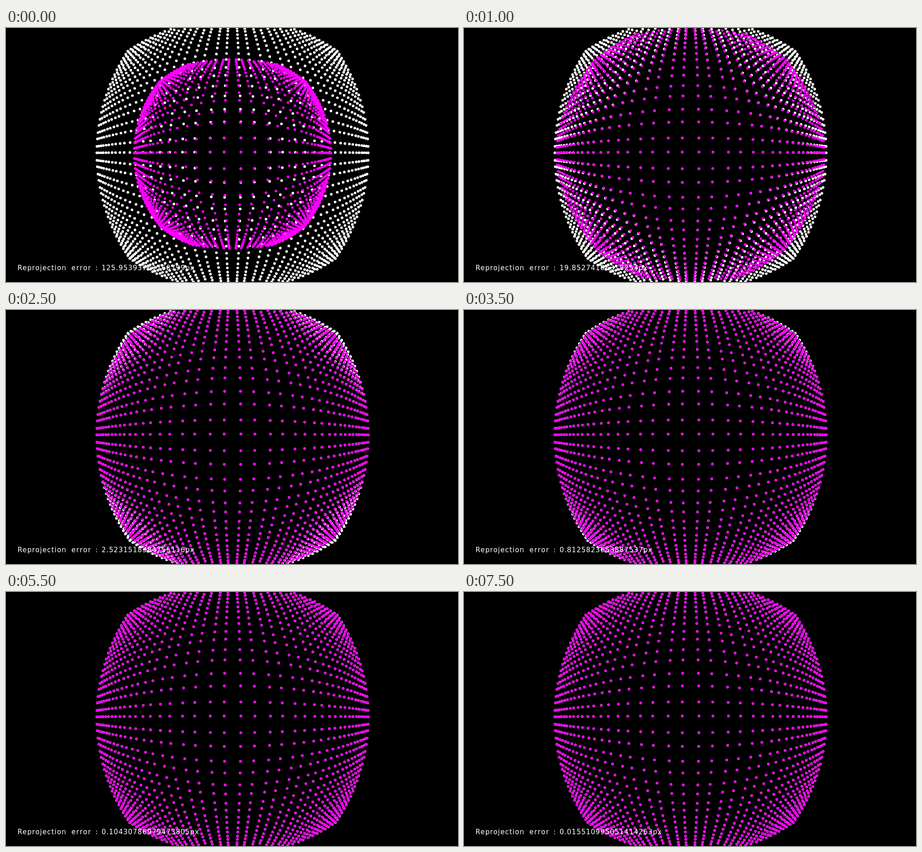
Recreate the animation shown at these times as an HTML page with a canvas. Size 998x561 px, loop 8000 ms.

```html
<!DOCTYPE html>
<html lang="en">
<head>
<meta charset="utf-8">
<title>Reprojection error</title>
<style>
  html, body { margin: 0; width: 100%; height: 100%; overflow: hidden; background: #000; }
  canvas { position: absolute; left: 0; top: 0; }
  span {
    position: absolute; top: 521px; line-height: 18px; white-space: pre;
    color: #fff; font-family: "DejaVu Sans", sans-serif; font-size: 15px;
  }
</style>
</head>
<body>
<canvas id="view" width="998" height="561"></canvas>
<span style="left:25.5px; letter-spacing:1.2px">Reprojection</span>
<span style="left:144.5px; letter-spacing:1.6px">error</span>
<span style="left:197.5px">:</span>
<span id="value" style="left:211px; letter-spacing:1px"></span>
<script>
const W = 998, H = 561, STEP = 500;
const CX = 500.2, CY = 277, F = 232, ALPHA = 0.6;
const DOT = 2.9;

const errors = [
  "125.95393761768799", "46.88465390047392", "19.85274106318254", "9.141180254842828",
  "4.760319528417063", "2.5231518384755116", "1.4207315962840377", "0.8125823653887537",
  "0.4809152736418205", "0.2884106395271846", "0.1732594081637529", "0.10430786979473805",
  "0.06412850397162843", "0.03971620485319574", "0.02480593718264051", "0.015510995051414263"
];

const ctx = document.getElementById("view").getContext("2d");
const value = document.getElementById("value");

// Unified camera model: plane point to image point, with the diagonal slopes.
function project(x, y) {
  const s = Math.sqrt(1 + (x * x + y * y) / (F * F));
  const d = ALPHA * s + 1 - ALPHA;
  const slope = v => (d - ALPHA * v * v / (F * F * s)) / (d * d);
  return { x: x / d, y: y / d, dx: slope(x), dy: slope(y) };
}

// Tag corners: gaps alternate between 37 and 31.6.
const axis = [];
for (let k = 0; k < 20; k++) {
  const u = (k % 2 ? 50.1 : 18.5) + 68.6 * (k >> 1);
  axis.push(u, -u);
}

const visible = [];
for (const v of axis) {
  for (const u of axis) {
    const p = project(u, v + 15.5);
    if (p.y + CY >= 0 && p.y + CY <= H) visible.push({ x: p.x, y: p.y });
  }
}

// Each pass inverts the model a little further, axis by axis.
const passes = [];
let guess = visible.map(p => ({ ...p }));
for (let n = 0; n < errors.length; n++) {
  const image = guess.map(g => project(g.x, g.y));
  passes.push(image);
  guess = guess.map((g, i) => ({
    x: g.x + (visible[i].x - image[i].x) / image[i].dx,
    y: g.y + (visible[i].y - image[i].y) / image[i].dy
  }));
}

function dots(points, color) {
  ctx.fillStyle = color;
  ctx.beginPath();
  for (const p of points) {
    const x = CX + p.x, y = CY + p.y;
    ctx.moveTo(x + DOT, y);
    ctx.arc(x, y, DOT, 0, 2 * Math.PI);
  }
  ctx.fill();
}

let shown = -1;
function show(n) {
  if (n === shown) return;
  shown = n;
  ctx.fillStyle = "#000";
  ctx.fillRect(0, 0, W, H);
  dots(visible, "#fff");
  dots(passes[n], "#f0f");
  value.textContent = errors[n] + "px";
}

const start = performance.now();
function tick() {
  const t = performance.now() - start;
  show(Math.floor(t / STEP) % errors.length);
  requestAnimationFrame(tick);
}
show(0);
requestAnimationFrame(tick);
</script>
</body>
</html>
```
